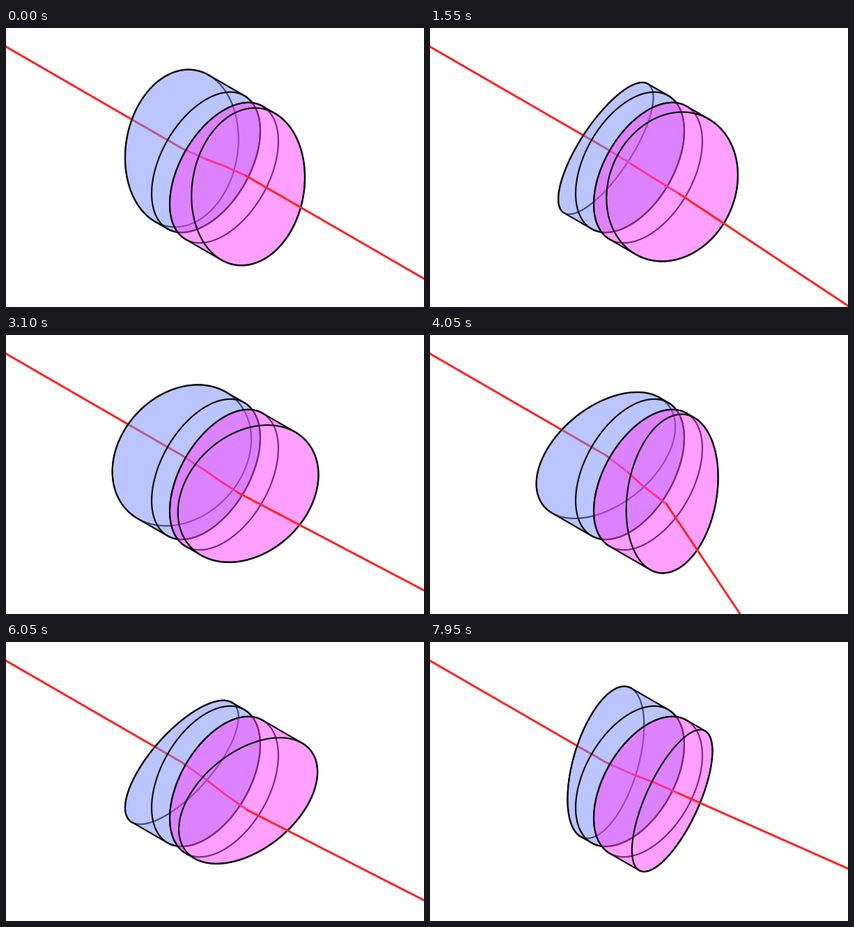
Animation of 600x400 px, one loop 8000 ms. Source, as a matplotlib script:

```python
import numpy as np
import matplotlib.pyplot as plt
from matplotlib.animation import FuncAnimation

W, H = 600, 400
FRAMES, STEP = 160, 50
PX = 0.72                       # points per pixel at 100 dpi

RADIUS, GAP, THICK, SLOPE = 90, 30, 40, 0.3
INDEX = 1.6
TURN_BLUE, TURN_PINK = -22, 28  # frames per turn

RED, BLACK = "#ff2424", "#0c0c0c"
BLUE = (120 / 255, 141 / 255, 1, 0.5)
PINK = (1, 64 / 255, 1, 0.5)

C30 = np.sqrt(3) / 2
PHI = np.radians(np.linspace(45, 405, 241))
HALF = len(PHI) // 2 + 1
FLAT = np.array([1.0, 0, 0])


def project(p):
    x, y, z = np.asarray(p, float).T
    return np.column_stack([W / 2 + C30 * (x + y), H / 2 + (x - y) / 2 - z])


def tilt(angle):
    """Normal of a wedge face turned to the given angle."""
    return np.array([1, -SLOPE * np.cos(angle), -SLOPE * np.sin(angle)])


def rim(x0, normal):
    y, z = RADIUS * np.cos(PHI), RADIUS * np.sin(PHI)
    return project(np.column_stack([x0 - normal[1] * y - normal[2] * z, y, z]))


def body(left, right):
    """Silhouette: left half of one rim joined to the right half of the other."""
    return np.vstack([left[:HALF], right[HALF - 1:]])


def refract(d, normal, ratio):
    n = normal / np.linalg.norm(normal)
    c = d @ n
    return ratio * d + (np.sqrt(1 - ratio**2 * (1 - c * c)) - ratio * c) * n


def trace(faces):
    p, d = np.array([-600.0, 0, 0]), FLAT
    path = [p]
    for (x0, normal), ratio in zip(faces, (1 / INDEX, INDEX, 1 / INDEX, INDEX)):
        p = p + d * ((np.array([x0, 0, 0]) - p) @ normal) / (d @ normal)
        path.append(p)
        d = refract(d, normal, ratio)
    path.append(p + 900 * d)
    return project(path)


fig = plt.figure(figsize=(W / 100, H / 100), dpi=100, facecolor="white")
ax = fig.add_axes([0, 0, 1, 1])
ax.set(xlim=(0, W), ylim=(H, 0))
ax.axis("off")


def line(z, color=BLACK, width=2.2):
    return ax.plot([], [], color=color, lw=width * PX, zorder=z,
                   solid_capstyle="round", solid_joinstyle="round")[0]


def fill(z, color):
    return ax.fill([0, 0, 0], [0, 0, 0], fc=color, ec="none", zorder=z)[0]


def prism(z, color):
    """Back rim, tinted body, outline and front rim, from back to front."""
    return line(z), fill(z + 2, color), line(z + 3), line(z + 3)


blue, pink = prism(1, BLUE), prism(6, PINK)
beam_in, beam_gap, beam_out = (line(z, RED, 3) for z in (2, 5, 10))


def place(parts, left, right):
    back, tint, edge, front = parts
    shape = body(left, right)
    back.set_data(*left.T)
    tint.set_xy(shape)
    edge.set_data(*np.vstack([shape, shape[:1]]).T)
    front.set_data(*right.T)


def draw(i):
    a = -np.pi / 2 + 2 * np.pi * i / TURN_BLUE
    b = -np.pi / 2 + 2 * np.pi * i / TURN_PINK
    near, far = GAP / 2, GAP / 2 + THICK
    faces = [(-far, tilt(a)), (-near, FLAT), (near, FLAT), (far, tilt(b))]
    rims = [rim(*f) for f in faces]
    place(blue, *rims[:2])
    place(pink, *rims[2:])
    path = trace(faces)
    beam_in.set_data(*path[:3].T)
    beam_gap.set_data(*path[2:5].T)
    beam_out.set_data(*path[4:].T)
    return [*blue, *pink, beam_in, beam_gap, beam_out]


anim = FuncAnimation(fig, draw, frames=FRAMES, interval=STEP,
                     repeat=True, repeat_delay=0, blit=False)
plt.show()
```
